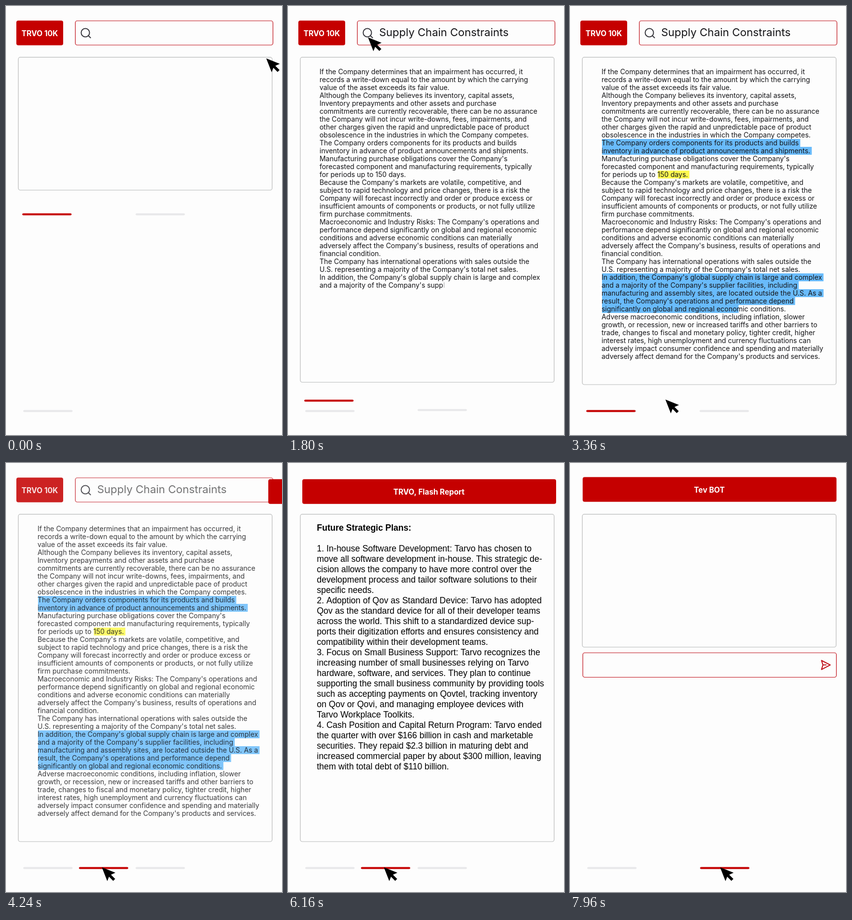
Animation of 560 by 868 pixels, one loop 8000 ms. Source, as an HTML page with a canvas:

```html
<!DOCTYPE html>
<html lang="en">
<head>
<meta charset="utf-8">
<style>
  html, body { margin: 0; width: 100%; height: 100%; overflow: hidden; background: #fdfdfd; }
  canvas { display: block; }
</style>
</head>
<body>
<canvas id="stage" width="560" height="868"></canvas>
<script>
const ctx = document.getElementById('stage').getContext('2d');
const LOOP = 8000;
const RED = '#c50000', GRAY = '#e8e8ea', PAPER = '#fdfdfd';
const FILING_FONT = '13.95px Inter, sans-serif';
const REPORT_FONT = '17.5px "Liberation Sans", Arial, sans-serif';
const HEADER_FONT = '700 15.3px Inter, sans-serif';

const filing = `If the Company determines that an impairment has occurred, it
records a write-down equal to the amount by which the carrying
value of the asset exceeds its fair value.
Although the Company believes its inventory, capital assets,
Inventory prepayments and other assets and purchase
commitments are currently recoverable, there can be no assurance
the Company will not incur write-downs, fees, impairments, and
other charges given the rapid and unpredictable pace of product
obsolescence in the industries in which the Company competes.
The Company orders components for its products and builds
inventory in advance of product announcements and shipments.
Manufacturing purchase obligations cover the Company's
forecasted component and manufacturing requirements, typically
for periods up to 150 days.
Because the Company's markets are volatile, competitive, and
subject to rapid technology and price changes, there is a risk the
Company will forecast incorrectly and order or produce excess or
insufficient amounts of components or products, or not fully utilize
firm purchase commitments.
Macroeconomic and Industry Risks: The Company's operations and
performance depend significantly on global and regional economic
conditions and adverse economic conditions can materially
adversely affect the Company's business, results of operations and
financial condition.
The Company has international operations with sales outside the
U.S. representing a majority of the Company's total net sales.
In addition, the Company's global supply chain is large and complex
and a majority of the Company's supplier facilities, including
manufacturing and assembly sites, are located outside the U.S. As a
result, the Company's operations and performance depend
significantly on global and regional economic conditions.
Adverse macroeconomic conditions, including inflation, slower
growth, or recession, new or increased tariffs and other barriers to
trade, changes to fiscal and monetary policy, tighter credit, higher
interest rates, high unemployment and currency fluctuations can
adversely impact consumer confidence and spending and materially
adversely affect demand for the Company's products and services.`.split('\n');

const report = `Future Strategic Plans:

1. In-house Software Development: Tarvo has chosen to
move all software development in-house. This strategic de-
cision allows the company to have more control over the
development process and tailor software solutions to their
specific needs.
2. Adoption of Qov as Standard Device: Tarvo has adopted
Qov as the standard device for all of their developer teams
across the world. This shift to a standardized device sup-
ports their digitization efforts and ensures consistency and
compatibility within their development teams.
3. Focus on Small Business Support: Tarvo recognizes the
increasing number of small businesses relying on Tarvo
hardware, software, and services. They plan to continue
supporting the small business community by providing tools
such as accepting payments on Qovtel, tracking inventory
on Qov or Qovi, and managing employee devices with
Tarvo Workplace Toolkits.
4. Cash Position and Capital Return Program: Tarvo ended
the quarter with over $166 billion in cash and marketable
securities. They repaid $2.3 billion in maturing debt and
increased commercial paper by about $300 million, leaving
them with total debt of $110 billion.`.split('\n');

const clamp = v => Math.min(1, Math.max(0, v));
const ramp = (t, from, to) => clamp((t - from) / (to - from));
const smooth = p => p < .5 ? 4 * p ** 3 : 1 - 4 * (1 - p) ** 3;
const ease = (t, from, to) => smooth(ramp(t, from, to));
const mix = (a, b, p) => a + (b - a) * p;

function withAlpha(alpha, draw) {
  if (alpha <= 0) return;
  ctx.save();
  ctx.globalAlpha = alpha;
  draw();
  ctx.restore();
}

function box(x, y, w, h, fill, stroke) {
  ctx.beginPath();
  ctx.roundRect(x, y, w, h, 4);
  if (fill) { ctx.fillStyle = fill; ctx.fill(); }
  if (stroke) { ctx.strokeStyle = stroke; ctx.lineWidth = 1.2; ctx.stroke(); }
}

function text(str, x, y, font, color = '#151518', align = 'left') {
  ctx.font = font;
  ctx.fillStyle = color;
  ctx.textAlign = align;
  ctx.fillText(str, x, y);
}

// Types str up to a fractional count; the newest character is still fading in.
function typed(str, count, x, y, font) {
  if (count <= 0) return;
  const whole = Math.floor(count);
  const done = str.slice(0, whole);
  text(done, x, y, font);
  if (whole < str.length) {
    const next = x + ctx.measureText(done).width;
    withAlpha(count - whole, () => text(str[whole], next, y, font));
  }
}

function stroke(path, color, width) {
  ctx.strokeStyle = color;
  ctx.lineWidth = width;
  ctx.lineCap = ctx.lineJoin = 'round';
  ctx.stroke(new Path2D(path));
}

const bar = (x, y, color) => stroke(`M${x + 2} ${y}h96`, color, 4);

function searchHeader(t) {
  withAlpha(1 - ramp(t, 4192, 4560), () => {
    box(21, 29.5, 95, 50, RED);
    text('TRVO 10K', 68.5, 60.5, HEADER_FONT, '#fff', 'center');
    box(140.6, 30, 401, 49, PAPER, '#c0101a');
    stroke('M169.5 54a8.5 8.5 0 1 1-17 0a8.5 8.5 0 1 1 17 0M167.3 60.2l4.2 4', '#3a3a40', 2);
  });
  withAlpha(1 - ramp(t, 4080, 4480), () => {
    const query = 'Supply Chain Constraints';
    typed(query, query.length * ramp(t, 80, 760), 185, 61, '22px Inter, sans-serif');
  });
}

function highlight(row, progress, color, from = '') {
  if (progress <= 0) return;
  ctx.font = FILING_FONT;
  const skip = ctx.measureText(from).width;
  const width = ctx.measureText(filing[row]).width - skip + 2;
  ctx.fillStyle = color;
  ctx.fillRect(65 + skip, 125 + row * 16, width * progress, 16);
}

function filingPage(t) {
  withAlpha(1 - ramp(t, 4180, 4560), () => {
    const blue = '#69bbfb';
    highlight(13, ramp(t, 2180, 2460), '#fdf950', 'for periods up to ');
    for (let i = 0; i < 2; i++) highlight(9 + i, ramp(t, 2627 + i * 180, 2927 + i * 180), blue);
    for (let i = 0; i < 5; i++) highlight(26 + i, ramp(t, 2420 + i * 180, 2720 + i * 180), blue);
    let count = (t - 860) * 1.6656;
    filing.forEach((line, row) => {
      typed(line, Math.min(count, line.length), 64, 138 + row * 16, FILING_FONT);
      count -= line.length;
    });
  });
}

// Each band of lines is uncovered by its own diagonal wipe.
function reportPage(t) {
  if (t < 4604) return;
  const bands = [0, 3, 6, 9, 12, 14, 17, 20, 24];
  withAlpha(1 - ramp(t, 7400, 7680), () => {
    for (let b = 0; b < bands.length - 1; b++) {
      const edge = 59 + (t - 4604) * 1.6 - 205 * b;
      if (edge <= 48) continue;
      const top = 121.5 + bands[b] * 21;
      const height = (bands[b + 1] - bands[b]) * 21;
      ctx.save();
      ctx.beginPath();
      ctx.moveTo(-100, top);
      ctx.lineTo(edge + 10, top);
      ctx.lineTo(edge + 10 - height, top + height);
      ctx.lineTo(-100, top + height);
      ctx.clip();
      for (let row = bands[b]; row < bands[b + 1]; row++) {
        text(report[row], 58.5, 137 + row * 21, (row ? '' : 'bold ') + REPORT_FONT, '#000');
      }
      ctx.restore();
    }
  });
}

function banner(x, y, label, alpha) {
  if (x >= 560) return;
  withAlpha(alpha, () => box(x, y, 515, 50, RED));
  withAlpha(clamp(alpha / .4), () => text(label, x + 257, y + 31.5, HEADER_FONT, '#fff', 'center'));
}

function panelBottom(t) {
  const low = 766, high = 372.5;
  if (t < 4240) return mix(high, low, ease(t, 740, 1980));
  if (t < 4506) return mix(low, high, ease(t, 4240, 4506));
  if (t < 7420) return mix(high, low, ease(t, 4506, 5706));
  return mix(low, high, ease(t, 7420, 7780));
}

function messageBox(t) {
  withAlpha(ramp(t, 7680, 7860), () => {
    box(26, 384, 514.5, 49.5, PAPER, '#c0101a');
    stroke('M510.3 399.5L528 408.6L510.3 417.8L513.2 408.6ZM513.2 408.6h6.5', '#c0101a', 2);
  });
}

function cursor(t) {
  let x = 528, y = 106;
  const go = (toX, toY, p) => { x = mix(x, toX, p); y = mix(y, toY, p); };
  go(162, 56, ease(t, 0, 860));
  go(194.5, 818, ease(t, 1487, 3807));
  go(304.5, 818, ease(t, 6450, 7550));
  ctx.save();
  ctx.translate(x, y);
  ctx.fillStyle = '#000';
  ctx.fill(new Path2D('M0 0L27.5 11L18.5 15L27 23.5L23 27.5L14.5 19L11 28Z'));
  ctx.restore();
}

function render(t) {
  ctx.fillStyle = PAPER;
  ctx.fillRect(0, 0, 560, 868);
  searchHeader(t);
  box(25, 103.7, 515, panelBottom(t) - 103.7, null, '#b9bbbb');
  filingPage(t);
  reportPage(t);
  messageBox(t);

  bar(35, 819.5, GRAY);
  bar(263, mix(421.5, 819.5, ease(t, 710, 1935)), GRAY);
  const redX = 33 + 115 * ease(t, 3880, 4200) + 116 * ease(t, 7155, 7655);
  bar(redX, mix(421.5, 819.5, ease(t, 850, 2095)), RED);

  banner(mix(640, 29, ease(t, 4029, 4629)), 32.7, 'TRVO, Flash Report', 1 - ramp(t, 7300, 7700));
  banner(mix(640, 25.7, ease(t, 7183, 7783)), 28.5, 'Tev BOT', 1);
  cursor(t);
}

function frame() {
  render(performance.now() % LOOP);
  requestAnimationFrame(frame);
}
frame();
</script>
</body>
</html>
```
